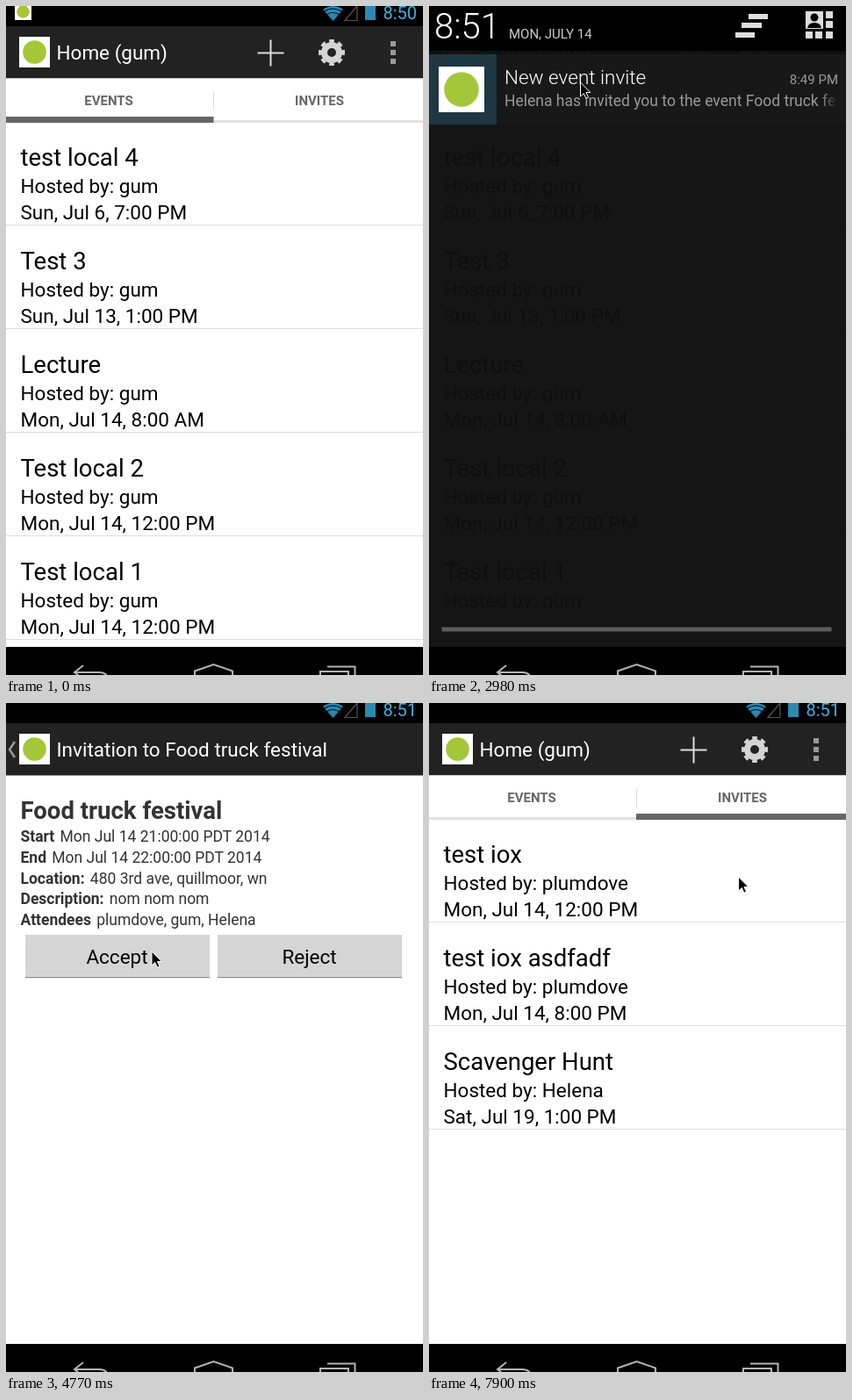
An HTML page for the animation above (8 s loop, 475 by 762 pixels).

```html
<!DOCTYPE html>
<html lang="en">
<head>
<meta charset="utf-8">
<title>Event invites</title>
<style>
html, body { margin: 0; width: 100%; height: 100%; overflow: hidden; background: #000; }
svg { display: block; width: 100%; height: 100%; font-family: Roboto, sans-serif; }
text { white-space: pre; }
</style>
</head>
<body>
<svg id="stage" viewBox="0 0 475 762"></svg>
<script>
const LOOP = 8000;
const stage = document.getElementById('stage');

const rect = (x, y, w, h, fill, extra = '') =>
  `<rect x="${x}" y="${y}" width="${w}" height="${h}" fill="${fill}" ${extra}/>`;
const text = (x, y, size, fill, content, extra = '') =>
  `<text x="${x}" y="${y}" font-size="${size}" fill="${fill}" ${extra}>${content}</text>`;
const line = (d, color, width = 2) =>
  `<path d="${d}" fill="none" stroke="${color}" stroke-width="${width}"/>`;
const appIcon = (x, y, size) => rect(x, y, size, size, '#fff') +
  `<circle cx="${x + size / 2}" cy="${y + size / 2}" r="${size * 0.38}" fill="#a4c639"/>`;

const actionBar = title => rect(0, 23, 475, 60, '#222') + appIcon(15, 35, 35) +
  text(57.5, 61, 22.5, '#fff', title);

const eventList = (x, items) => items.map(([title, host, date], i) => {
  const y = 132 + i * 118;
  return text(x + 16.5, y + 50, 27.5, '#000', title) +
    text(x + 16.5, y + 81, 22.5, '#000', 'Hosted by: ' + host) +
    text(x + 16.5, y + 111, 22.5, '#000', date) +
    rect(x, y + 117, 475, 1, '#ddd');
}).join('');

const events = [
  ['test local 4', 'gum', 'Sun, Jul 6, 7:00 PM'],
  ['Test 3', 'gum', 'Sun, Jul 13, 1:00 PM'],
  ['Lecture', 'gum', 'Mon, Jul 14, 8:00 AM'],
  ['Test local 2', 'gum', 'Mon, Jul 14, 12:00 PM'],
  ['Test local 1', 'gum', 'Mon, Jul 14, 12:00 PM']
];
const invites = [
  ['test iox', 'plumdove', 'Mon, Jul 14, 12:00 PM'],
  ['test iox asdfadf', 'plumdove', 'Mon, Jul 14, 8:00 PM'],
  ['Scavenger Hunt', 'Helena', 'Sat, Jul 19, 1:00 PM']
];

const gear = `<g fill="none" stroke="#d4d4d4">
  <circle cx="371" cy="53" r="8.5" stroke-width="7"/>
  <circle cx="371" cy="53" r="12.8" stroke-width="4.4" pathLength="16"
    stroke-dasharray="1.1 .9" stroke-dashoffset=".55"/></g>`;

const tabLabel = (x, label) =>
  text(x, 113, 15, '#666', label, 'font-weight="700" text-anchor="middle"');

const home = actionBar('Home (gum)') +
  line('M286.5 53.5H316.5M301.5 38.5V68.5', '#ddd') + gear +
  [40, 50, 60].map(y => rect(438, y, 6, 6, '#999')).join('') +
  rect(0, 82.5, 475, 647.5, '#fff') +
  `<g id="pages">${eventList(0, events)}${eventList(475, invites)}</g>` +
  rect(0, 82.5, 475, 50.5, '#fff') +
  rect(237, 83, 238, 50, '#ccc', 'id="pressed"') +
  rect(236, 97, 1, 22, '#ddd') + rect(0, 130, 475, 3, '#e2e2e2') +
  rect(0, 126, 237, 7, '#666', 'id="indicator"') +
  tabLabel(117, 'EVENTS') + tabLabel(357, 'INVITES');

const detail = (i, label, value, id = '') =>
  text(16.5, 158.2 + i * 23.75, 17.5, '#333',
    `<tspan font-weight="700">${label}</tspan><tspan dx="6.25" id="${id}">${value}</tspan>`);
const button = (x, label) => rect(x, 264, 210, 49, '#d5d5d5') +
  rect(x, 312, 210, 1.2, '#8c8c8c') +
  text(x + 104.5, 297, 22.5, '#000', label, 'text-anchor="middle"');

const invitation = actionBar('Invitation to Food truck festival') +
  line('M10 44L4 53L10 62', '#999', 2.5) + rect(0, 82.5, 475, 647.5, '#fff') +
  text(16.5, 132, 27.5, '#333', 'Food truck festival', 'font-weight="700"') +
  detail(0, 'Start', 'Mon Jul 14 21:00:00 PDT 2014') +
  detail(1, 'End', 'Mon Jul 14 22:00:00 PDT 2014') +
  detail(2, 'Location:', '480 3rd ave, quillmoor, wn') +
  detail(3, 'Description:', 'nom nom nom') +
  detail(4, 'Attendees', 'plumdove, gum, Helena', 'attendees') +
  button(22, 'Accept') + button(241, 'Reject');

const statusBar = rect(0, 0, 475, 23, '#000') +
  `<g id="notice">${appIcon(10, -3, 19)}</g>` +
  '<path d="M361 4Q372.5 -4 384 4L372.5 17Z" fill="#2389b5"/>' +
  line('M362 6.5Q372.5 -.5 383 6.5M365 10Q372.5 5 380 10', '#000', 1.2) +
  line('M386 16.5H400V0Z', '#555', 1.2) + rect(409, 0, 12, 16, '#2a8ab0') +
  text(429.5, 15, 20, '#33b5e5', '', 'id="clock"');

const navBar = rect(0, 730, 475, 32, '#000') +
  line('M88 751L78 759L88 767M78 759H106Q116 759 116 768', '#b4b4b4') +
  line('M215 764V757.5L236.5 750L258 757.5V764', '#b4b4b4') +
  line('M358 764V758H390V764M366 752.5H397.5V764', '#b4b4b4');

const gridIcon = [[452, 6], [452, 17], [429, 29], [440, 29], [452, 29]]
  .map(([x, y]) => rect(x, y, 8, 8, '#ddd')).join('') +
  rect(429, 6, 20, 20, '#ddd') +
  '<circle cx="439" cy="13" r="4.5"/><path d="M431 25Q432 19 439 19T447 25Z"/>';

const shade = rect(0, 0, 475, 730, '#000', 'id="scrim"') +
  `<g clip-path="url(#panel)">
    ${rect(0, 0, 475, 730, '#101010', 'opacity=".93"')}
    ${rect(0, 0, 475, 51, '#000')}
    ${text(6, 37, 40, '#fff', '8:51', 'font-weight="300"')}
    ${text(91, 37, 15, '#ccc', 'MON, JULY 14')}
    ${rect(364, 9, 22, 6, '#ddd') + rect(356, 19, 23, 6, '#ddd') + rect(349, 30, 22, 6, '#ddd')}
    ${gridIcon}
    ${rect(0, 55, 475, 80, '#181818') + rect(0, 55, 77, 80, '#1f3643') + appIcon(11, 69, 52)}
    ${text(86, 89, 22.5, '#fff', 'New event invite', 'font-weight="300"')}
    ${text(466, 89, 15, '#999', '8:49 PM', 'text-anchor="end"')}
    ${text(86, 114, 17.5, '#999', 'Helena has invited you to the event Food truck festival')}
    ${rect(445, 94, 21, 30, 'url(#fade)') + rect(465, 94, 10, 30, '#181818')}
    <g id="handle">${rect(0, -44, 475, 44, '#151515') + rect(14.5, -22.5, 444, 5, '#5c5c5c')}</g>
  </g>`;

stage.innerHTML = `<defs>
    <clipPath id="panel"><rect id="panelBox" width="475" height="0"/></clipPath>
    <linearGradient id="fade"><stop stop-color="#181818" stop-opacity="0"/>
      <stop offset="1" stop-color="#181818"/></linearGradient>
  </defs>
  ${home}<g id="invitation">${invitation}</g>${statusBar}
  <g id="shade">${shade}</g>${navBar}
  <path id="cursor" d="M0 0V16L3.8 12.6L6.4 18.2L9 17L6.5 11.5H11.4Z" stroke="#fff"/>`;

const part = {};
stage.querySelectorAll('[id]').forEach(node => { part[node.id] = node; });
const set = (id, name, value) => part[id].setAttribute(name, value);
const show = (id, visible) => set(id, 'visibility', visible ? 'visible' : 'hidden');

const bursts = [[750, 1500, 6], [2230, 2980, 6], [3430, 3730, 3], [4030, 4770, 6],
  [5970, 6110, 2], [6560, 7010, 4], [7300, 7900, 5]];

function recordedTime(t) {
  let now = 0;
  for (const [start, end, steps] of bursts) {
    if (t < start) break;
    const gap = (end - start) / (steps - 1);
    now = Math.min(end, start + Math.floor((t - start) / gap + 1e-6) * gap);
  }
  return now;
}

// Linear interpolation over keys of [time, ...values].
function track(keys, t) {
  const next = keys.findIndex(key => key[0] > t);
  if (next === 0) return keys[0].slice(1);
  if (next < 0) return keys[keys.length - 1].slice(1);
  const a = keys[next - 1], b = keys[next];
  const k = (t - a[0]) / (b[0] - a[0]);
  return a.slice(1).map((v, i) => v + (b[i + 1] - v) * k);
}

const cursorPath = [[750, 388, 745], [1200, 350, 300], [1350, 349, 125],
  [1500, 220.5, 7], [2530, 220.5, 7], [2980, 172.5, 87], [4030, 172.5, 87],
  [4770, 166, 283], [6410, 166, 283], [6710, 330, 150], [7010, 419, 86],
  [7450, 419, 86], [7900, 352.5, 198]];
const shadeHeight = [[2080, 0], [2230, 130], [2380, 381], [2530, 730], [3280, 730],
  [3430, 520], [3580, 180], [3730, 0]];
const pageShift = [[7300, 0], [7450, 0.6], [7600, 1]];

function draw(t) {
  const now = recordedTime(t);

  const [x, y] = track(cursorPath, now);
  set('cursor', 'transform', `translate(${x} ${y})`);
  show('cursor', now >= 750 && now < 1500 || now >= 2230);

  const [height] = track(shadeHeight, now);
  show('shade', height > 0);
  set('panelBox', 'height', height);
  set('handle', 'transform', `translate(0 ${height})`);
  set('scrim', 'opacity', Math.min(0.6, height / 720));

  part.clock.textContent = now < 2230 ? '8:50' : '8:51';
  show('notice', now < 3430);

  const closing = now >= 5970;
  show('invitation', now >= 3580 && now < 6110);
  set('invitation', 'opacity', closing ? 0.42 : 1);
  set('invitation', 'transform',
    closing ? 'translate(237 376) scale(.885) translate(-237.5 -376)' : '');
  part.attendees.textContent = now < 4030 ? '' : 'plumdove, gum, Helena';

  const [page] = track(pageShift, now);
  set('pages', 'transform', `translate(${-475 * page} 0)`);
  set('indicator', 'x', 236 * page);
  set('indicator', 'width', 236.5 + 2.5 * page);
  show('pressed', now === 7300);
}

function tick() {
  draw(performance.now() % LOOP);
  requestAnimationFrame(tick);
}
tick();
</script>
</body>
</html>
```
